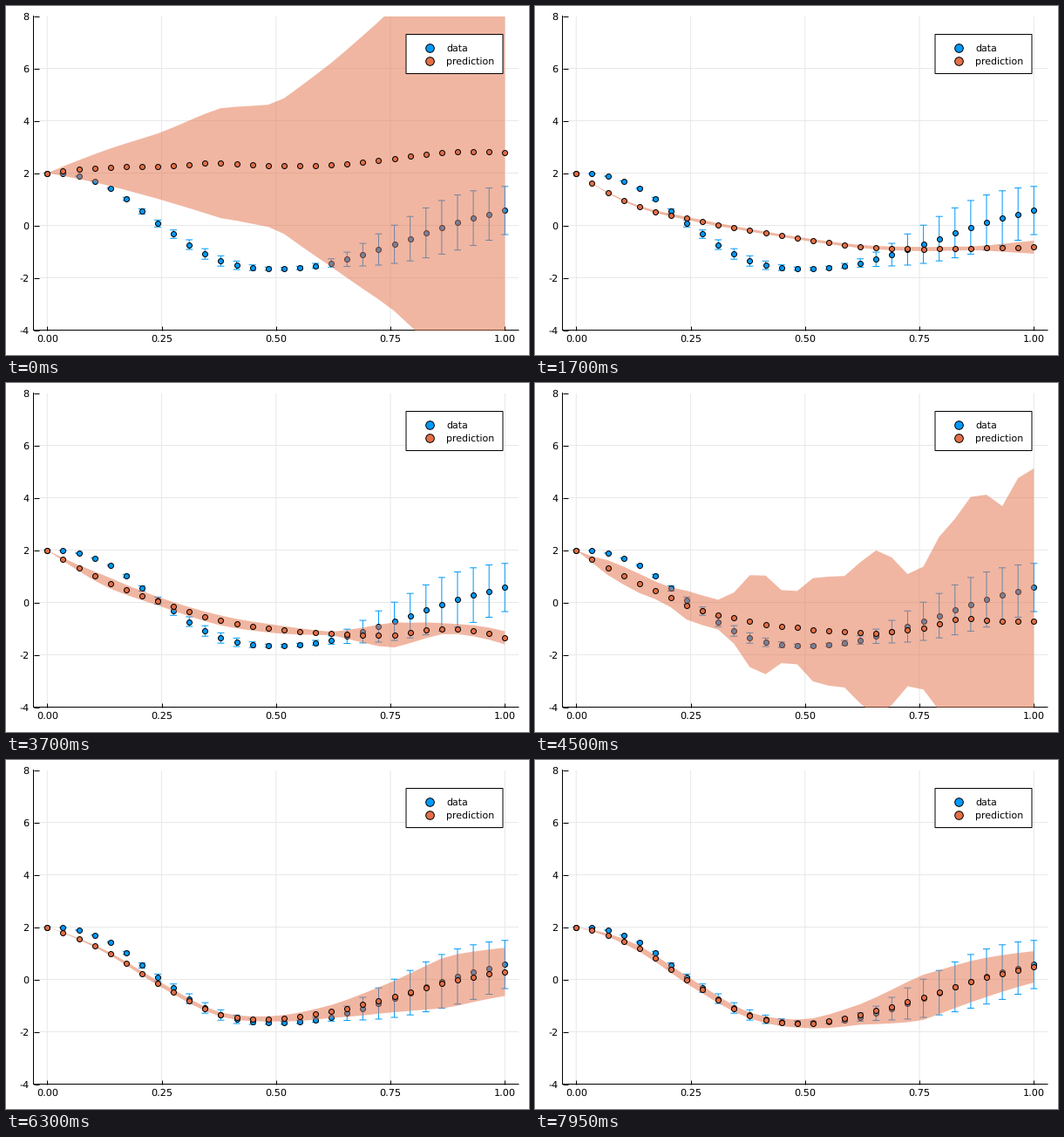
A matplotlib script that plays this animation: 600 by 400 pixels, repeating every 8 s.

```python
import numpy as np
import matplotlib.pyplot as plt
from matplotlib.animation import FuncAnimation
from matplotlib.patches import Rectangle
from matplotlib.transforms import IdentityTransform

W, H, DPI = 600, 400, 100
STEP, FRAMES = 50, 160
PX = 72 / DPI                       # one pixel in points
LEFT, RIGHT, TOP, BOTTOM = 31.5, 588, 11.5, 371.5
X0, SPAN = 47.3, 525                # pixel of x = 0, pixels per unit of x
BLUE, ORANGE = "#009afa", "#e36f47"

plt.rcParams.update({"font.family": "DejaVu Sans", "font.size": 11.2 * PX,
                     "text.hinting": "none", "path.snap": False})

u = np.linspace(0, 1, 30)


def smooth(*v):
    """Cubic curve through evenly spaced heights, sampled at u."""
    v = np.array(v, float)
    slope = np.gradient(v, edge_order=2)
    s = u * (len(v) - 1)
    k = np.minimum(s.astype(int), len(v) - 2)
    f = s - k
    return (v[k] * (1 + 2 * f) * (1 - f) ** 2 + slope[k] * f * (1 - f) ** 2
            + v[k + 1] * f * f * (3 - 2 * f) + slope[k + 1] * f * f * (f - 1))


def kinked(*v):
    return np.interp(u, np.linspace(0, 1, len(v)), v)


def ripple(rng):
    return np.convolve(rng.normal(size=32), [.3, .6, .3], "valid")


data = smooth(2, 1.54, -.03, -1.33, -1.66, -1.42, -.77, 0, .57)
error = smooth(0, .02, .14, .2, .055, .17, .7, 1.04, .92)

# time in ms, mean curve, half width of the band
decay = smooth(2, .79, .24, -.17, -.53, -.81, -.9, -.87, -.83)
stages = [
    (0, smooth(2, 2.21, 2.27, 2.38, 2.27, 2.32, 2.53, 2.81, 2.77),
     kinked(0, .65, 1.29, 2.09, 2.37, 3.95, 5.66, 8, 9.5)),
    (900, decay - .13 * u, .03 + .95 * u ** 1.5),
    (1700, decay, kinked(0, .04, .06, .05, .05, .06, .08, .07, .25)),
    (2700, smooth(2, .82, .12, -.52, -.78, -1.1, -1.17, -1.23, -1.3),
     kinked(0, .08, .2, .2, .15, .12, .1, .3, .42)),
    (3700, smooth(2, .83, 0, -.67, -1.02, -1.19, -1.25, -1, -1.35),
     kinked(0, .21, .16, .19, .16, .06, .5, .18, .25)),
    (5250, smooth(2, .82, -.16, -.93, -1.15, -1.02, -.74, -.45, -.16),
     kinked(0, .22, .6, .43, .57, .38, .76, 1, .7)),
    (6300, smooth(2, 1.09, -.22, -1.32, -1.5, -1.21, -.69, -.1, .29),
     kinked(0, .05, .09, .08, .1, .25, .57, 1, .92)),
    (7950, smooth(2, 1.29, -.11, -1.35, -1.69, -1.32, -.73, -.02, .48),
     kinked(0, .11, .15, .11, .16, .4, .87, .78, .6)),
]


def state(n):
    """Mean curve and band half width for frame n."""
    t = n * STEP
    for (t0, m0, w0), (t1, m1, w1) in zip(stages, stages[1:]):
        if t <= t1:
            break
    p = (t - t0) / (t1 - t0)
    mean = m0 + (m1 - m0) * p
    width = (w0 + .01) ** (1 - p) * (w1 + .01) ** p - .01
    # short spell in which the spread blows up
    width += 9 * u ** 2 * np.exp(-((t - 4400) / 145) ** 2)
    # sampling noise, strongest between the stages
    rng = np.random.default_rng(500 + n)
    noise = np.sqrt(abs(np.sin(np.pi * p)))
    width *= np.exp(.35 * noise * ripple(rng))
    mean += .1 * noise * np.minimum(width, .7) * ripple(rng)
    return mean, width


fig = plt.figure(figsize=(W / DPI, H / DPI), dpi=DPI, facecolor="white")
ax = fig.add_axes([LEFT / W, 1 - BOTTOM / H, (RIGHT - LEFT) / W, (BOTTOM - TOP) / H])
ax.set_xlim((LEFT - X0) / SPAN, (RIGHT - X0) / SPAN)
ax.set_ylim(-4, 8)
ax.set_axisbelow(True)
ax.grid(color="#e8e8e8", lw=PX)
ax.spines[["top", "right"]].set_visible(False)
ax.spines[["left", "bottom"]].set_linewidth(PX)
ax.set_xticks(np.arange(5) / 4, [f"{k / 4:.2f}" for k in range(5)])
ax.set_yticks(range(-4, 9, 2), [str(v) for v in range(-4, 9, 2)])
ax.tick_params(direction="in", length=5.5 * PX, width=PX, pad=4.7 * PX)


def dots(x, y, color, z, size=6.0, **kw):
    return ax.scatter(x, y, s=(size * PX) ** 2, c=color, edgecolors="black",
                      linewidths=PX, zorder=z, **kw)


# measured points with error bars
bar = dict(color=BLUE, lw=PX, zorder=2)
cap = 4 / SPAN
ax.vlines(u, data - error, data + error, **bar)
for end in (data - error, data + error):
    ax.hlines(end, u - cap, u + cap, **bar)
dots(u, data, BLUE, 3)

# prediction
band = ax.fill(u, data, color=ORANGE, alpha=.5, lw=0, zorder=4)[0]
pred = dots(u, data, ORANGE, 5)

# legend, placed in pixels
pix = IdentityTransform()
ax.add_patch(Rectangle((459, H - 77.5), 111, 45, fc="white", ec="black",
                       lw=PX, zorder=6, transform=pix))
for y, color, text in ((47.5, BLUE, "data"), (62.7, ORANGE, "prediction")):
    dots([486], [H - y], color, 7, 9.6, transform=pix)
    ax.text(505.5, H - y - 4.3, text, va="baseline", fontsize=11 * PX,
            zorder=7, transform=pix)


def draw(n):
    mean, width = state(n)
    band.set_xy(np.column_stack([np.r_[u, u[::-1]],
                                 np.r_[mean - width, (mean + width)[::-1]]]))
    pred.set_offsets(np.column_stack([u, mean]))
    return band, pred


anim = FuncAnimation(fig, draw, frames=FRAMES, interval=STEP,
                     repeat=True, repeat_delay=0)
plt.show()
```
